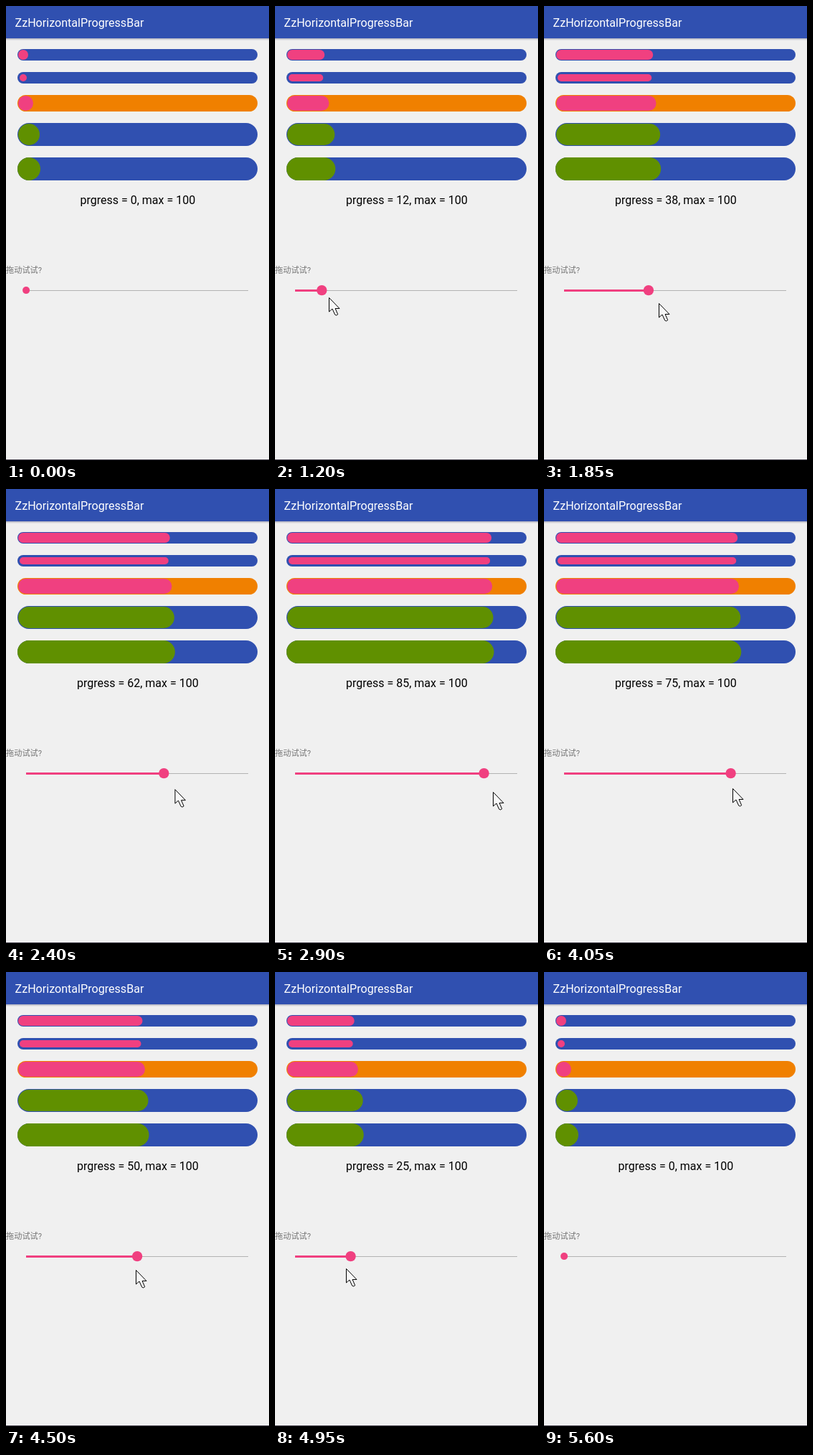
An HTML page that plays this animation: 367x634 px, repeating every 6.05 s.

```html
<!DOCTYPE html>
<html lang="en">
<head>
<meta charset="utf-8">
<title>Horizontal progress bars</title>
<style>
  html, body { margin: 0; width: 100%; height: 100%; overflow: hidden; background: #f0f0f0; }
  svg { display: block; width: 367px; height: 634px; }
  text { font-family: Roboto, "Noto Sans CJK SC", "Noto Sans CJK", sans-serif; }
</style>
</head>
<body>
<svg viewBox="0 0 367 634" xmlns="http://www.w3.org/2000/svg">
  <defs>
    <linearGradient id="shade" x1="0" y1="0" x2="0" y2="1">
      <stop offset="0" stop-color="#b0b0bc"/>
      <stop offset="1" stop-color="#f0f0f0"/>
    </linearGradient>
  </defs>
  <rect width="367" height="634" fill="#f0f0f0"/>
  <rect y="45" width="367" height="3" fill="url(#shade)"/>
  <rect width="367" height="45" fill="#3050b0"/>
  <text x="12.5" y="28.5" font-size="16.1" fill="#fff">ZzHorizontalProgressBar</text>
  <g id="bars"></g>
  <text id="label" x="183.8" y="276" font-size="16" text-anchor="middle"></text>
  <text x="0" y="372.3" font-size="11.2" fill="#757575">拖动试试?</text>
  <rect x="28" y="396" width="310" height="1" fill="#b2b2b2"/>
  <rect id="seek" x="28" y="395" height="3" fill="#f04080"/>
  <circle id="thumb" cy="396.1" fill="#f04080"/>
  <path id="cursor" d="M0 0V19.5L4.5 15.5L8.2 23.6L10 24.5L12.2 23.2L8.6 15H14.5Z"
        fill="#f8f8f8" stroke="#000" stroke-linejoin="round"/>
  <rect y="632" width="367" height="2" fill="#100818"/>
</svg>
<script>
const LOOP = 6050, STEP = 50;
const LEFT = 16, WIDTH = 335, GAP = 16, FIRST_TOP = 60;
const BLUE = "#3050b0", PINK = "#f04080", ORANGE = "#f08000", GREEN = "#609000";

const barSpecs = [
  { height: 16, pad: 1, track: BLUE, color: PINK },
  { height: 16, pad: 3, track: BLUE, color: PINK },
  { height: 23, pad: 1, track: ORANGE, color: PINK },
  { height: 32, pad: 1, track: BLUE, color: GREEN },
  { height: 32, pad: 0, track: BLUE, color: GREEN }
];

// pointer path: time, x, y
const path = [
  [350, 0.5, 398],
  [950, 42.5, 401],
  [1200, 75.5, 406.5],
  [1850, 160.5, 414.5],
  [2900, 304.5, 422.5],
  [3200, 352.5, 423],
  [3550, 349.5, 422.5],
  [4050, 263.5, 417.5],
  [4950, 99.5, 413.5],
  [5550, 5.5, 413]
];

const byId = id => document.getElementById(id);
const clamp = (v, low, high) => Math.min(high, Math.max(low, v));
const set = (el, attrs) => {
  for (const name in attrs) el.setAttribute(name, attrs[name]);
};

function pill(x, y, width, height, fill) {
  const el = document.createElementNS("http://www.w3.org/2000/svg", "rect");
  set(el, { x, y, width, height, rx: height / 2, fill });
  byId("bars").append(el);
  return el;
}

let top_ = FIRST_TOP;
const bars = barSpecs.map(({ height, pad, track, color }) => {
  const size = height - 2 * pad;
  pill(LEFT, top_, WIDTH, height, track);
  const el = pill(LEFT + pad, top_ + pad, size, size, color);
  top_ += height + GAP;
  return { el, size, range: WIDTH - 2 * pad - size };
});

// A slightly quickening drag to the right, then a steady one back.
function progressAt(t) {
  const u = Math.max(0, t - 900);
  const rise = u * (0.0385 + 2e-6 * u);
  const fall = (5400 - t) / 18;
  return Math.round(clamp(Math.min(rise, fall), 0, 100));
}

function pointerAt(t) {
  const i = clamp(path.findIndex(point => point[0] >= t), 1, path.length - 1);
  const [t0, x0, y0] = path[i - 1], [t1, x1, y1] = path[i];
  const k = (t - t0) / (t1 - t0);
  return [x0 + (x1 - x0) * k, y0 + (y1 - y0) * k];
}

function draw(time) {
  const t = Math.floor((time % LOOP) / STEP) * STEP;
  const progress = progressAt(t);
  for (const { el, size, range } of bars) {
    set(el, { width: size + range * progress / 100 });
  }
  byId("label").textContent = `prgress = ${progress}, max = 100`;
  set(byId("seek"), { width: 3.1 * progress });

  const pressed = t >= 850 && t < 5600;
  set(byId("thumb"), { cx: 28.1 + 3.1 * progress, r: pressed ? 7.2 : 5 });

  const visible = t >= 350 && t < 5600;
  const [x, y] = pointerAt(t);
  set(byId("cursor"), {
    transform: `translate(${x} ${y})`,
    visibility: visible ? "visible" : "hidden"
  });
}

const start = performance.now();
function tick() {
  draw(performance.now() - start);
  requestAnimationFrame(tick);
}
tick();
</script>
</body>
</html>
```
